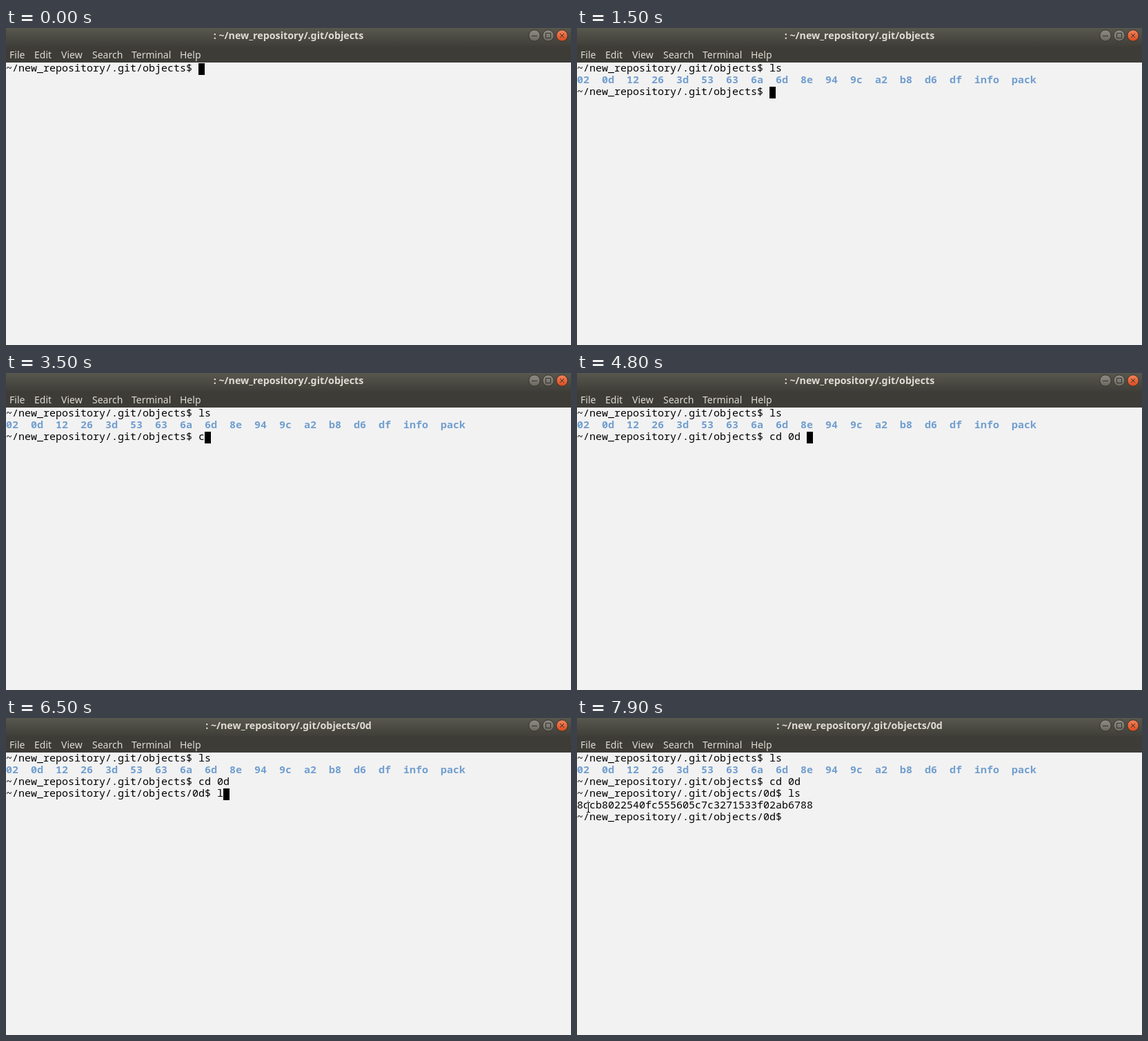
Animation, 819 px wide and 459 px high, one loop 8 s. Source, as an HTML page with a canvas:

```html
<!DOCTYPE html>
<html lang="en">
<head>
<meta charset="utf-8">
<title>Terminal</title>
<style>
  html, body { margin: 0; height: 100%; overflow: hidden; background: #f2f2f2; }
  canvas { display: block; }
</style>
</head>
<body>
<canvas id="stage" width="819" height="459"></canvas>
<script>
const ctx = document.getElementById('stage').getContext('2d');
const LOOP = 8000, CELL = 9, ROW = 17, TOP = 51;
const MONO = '15px "Noto Sans Mono", monospace';
const SANS = '"Noto Sans", sans-serif';
const PATH = '~/new_repository/.git/objects';
const FOLDERS = '02  0d  12  26  3d  53  63  6a  6d  8e  94  9c  a2  b8  d6  df  info  pack';
const HASH = '8dcb8022540fc555605c7c3271533f02ab6788';

// Each command: prompt path, [time, typed text] steps, time it runs, output
const COMMANDS = [
  { path: PATH, keys: [[1300, 'l'], [1400, 'ls']], run: 1500, output: FOLDERS, folders: true },
  { path: PATH, keys: [[3500, 'c'], [3600, 'cd'], [4000, 'cd '], [4500, 'cd 0'], [4800, 'cd 0d ']], run: 5500 },
  { path: PATH + '/0d', keys: [[6500, 'l'], [6600, 'ls']], run: 6700, output: HASH },
  { path: PATH + '/0d', keys: [], run: Infinity }
];
const CURSOR_OFF = [[400, 1000], [2000, 2600], [3200, 3300], [5800, 6400], [7300, LOOP]];
const MENU = [['File', 5], ['Edit', 41], ['View', 80], ['Search', 125], ['Terminal', 182], ['Help', 252]];

function text(str, x, y, font, color, align = 'left') {
  ctx.font = font;
  ctx.fillStyle = color;
  ctx.textAlign = align;
  ctx.fillText(str, x, y);
}

function gradient(y0, y1, from, to) {
  const g = ctx.createLinearGradient(0, y0, 0, y1);
  g.addColorStop(0, from);
  g.addColorStop(1, to);
  return g;
}

function button(x, light, dark, icon) {
  ctx.beginPath();
  ctx.arc(x, 11, 8.2, 0, 7);
  ctx.fillStyle = gradient(3, 19, light, dark);
  ctx.fill();
  ctx.strokeStyle = '#33322d';
  ctx.lineWidth = 1;
  ctx.stroke();
  ctx.stroke(new Path2D(icon));
}

function drawWindow(title) {
  ctx.fillStyle = '#f2f2f2';
  ctx.fillRect(0, 0, 819, 459);
  ctx.fillStyle = gradient(0, 28, '#59584e', '#3d3c37');
  ctx.fillRect(0, 0, 819, 50);
  text(title, 409.5, 16, 'bold 14.28px ' + SANS, '#dfdbd2', 'center');
  for (const [label, x] of MENU) text(label, x, 44, '14px ' + SANS, '#dfdbd2');
  button(766, '#8f8d83', '#69675e', 'M762 11.5h8');
  button(786, '#8f8d83', '#69675e', 'M782.5 7.5h7v7h-7z');
  button(806, '#f4835c', '#dc4a1c', 'M803 8l6 6m0 -6l-6 6');
}

function drawTerminal(t) {
  let y = TOP;
  for (const { path, keys, run, output, folders } of COMMANDS) {
    const typed = keys.filter(([at]) => t >= at).map(key => key[1]).pop() || '';
    const line = path + '$ ' + typed;
    text(line, 0, y + 12, MONO, '#000');
    if (t < run) {
      const hidden = CURSOR_OFF.some(([from, to]) => t >= from && t < to);
      if (!hidden) ctx.fillRect(line.length * CELL, y, CELL, ROW);
      return;
    }
    y += ROW;
    if (output) {
      text(output, 0, y + 12, folders ? 'bold ' + MONO : MONO, folders ? '#729fcf' : '#000');
      y += ROW;
    }
  }
}

function drawPointer(x, y) {
  const beam = new Path2D();
  beam.addPath(new Path2D('M1 1.5h2l.5 .5l.5 -.5h2M3.5 2v13M1 15.5h2l.5 -.5l.5 .5h2'), { e: x, f: y });
  ctx.lineWidth = 3;
  ctx.strokeStyle = '#fff';
  ctx.stroke(beam);
  ctx.lineWidth = 1.2;
  ctx.strokeStyle = '#000';
  ctx.stroke(beam);
}

function frame() {
  const t = performance.now() % LOOP;
  drawWindow(': ' + PATH + (t >= 5300 ? '/0d' : ''));
  drawTerminal(t);
  if (t >= 7900) drawPointer(13, 121);
  else if (t >= 7700) drawPointer(5, 56);
  requestAnimationFrame(frame);
}
frame();
</script>
</body>
</html>
```
